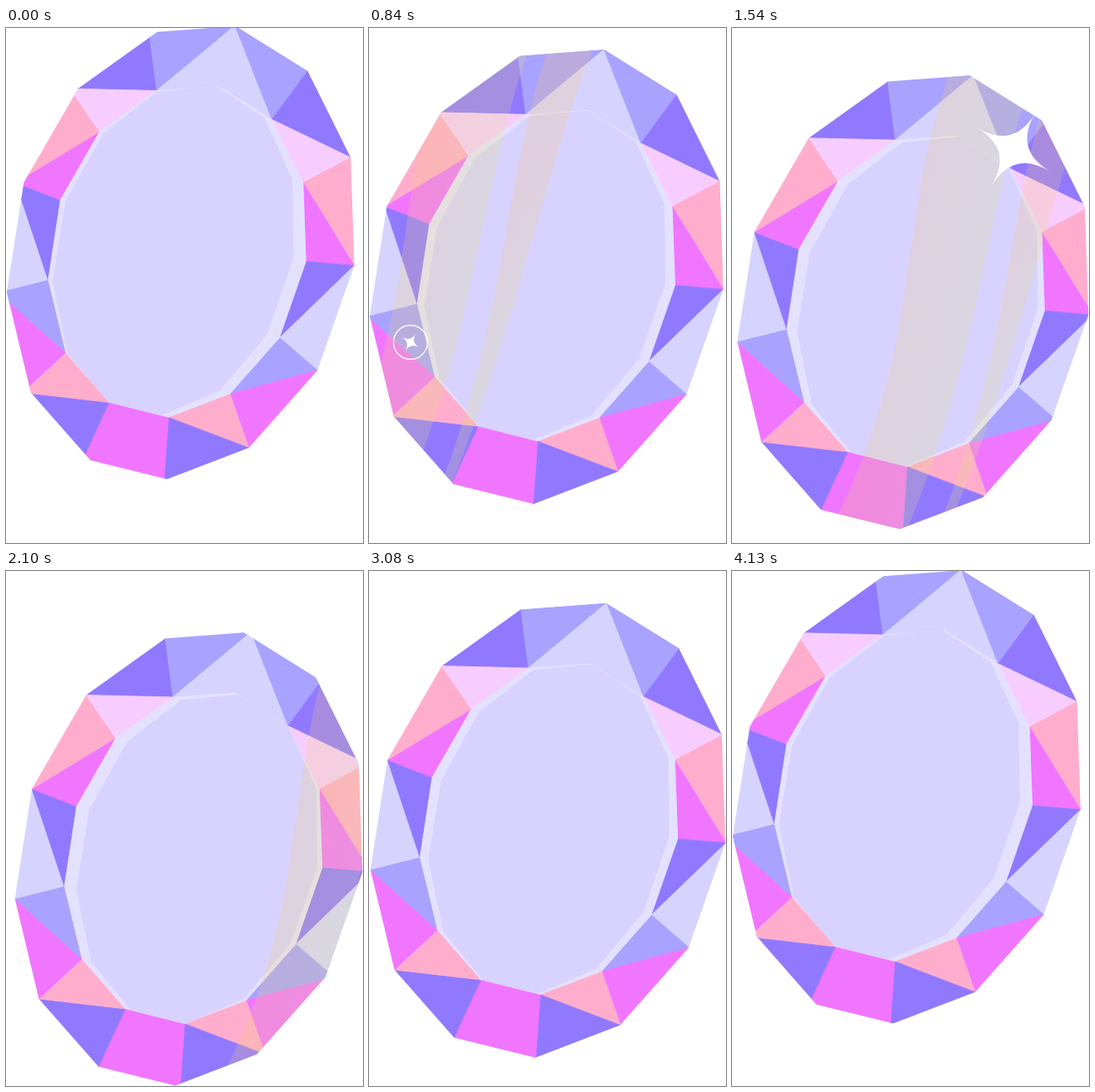
These frames come from a looping animation (430x621 px, 4200 ms). An HTML page with a canvas:

```html
<!DOCTYPE html>
<html lang="en">
<head>
<meta charset="utf-8">
<title>Gem</title>
<style>
html, body { margin: 0; width: 100%; height: 100%; overflow: hidden; background: #fff; }
canvas { display: block; }
</style>
</head>
<body>
<canvas id="stage" width="430" height="621"></canvas>
<script>
const ctx = document.getElementById('stage').getContext('2d');
const LOOP = 4200, STEP = 70, SIDES = 13;

// Regular polygon sheared onto a slanted ellipse: centre, cosine axis, sine axis
function ring(cx, cy, ux, uy, vx, vy) {
  return Array.from({ length: SIDES }, (_, k) => {
    const a = 2 * Math.PI * k / SIDES, c = Math.cos(a), s = Math.sin(a);
    return [cx + ux * c + vx * s, cy + uy * c + vy * s];
  });
}

const outer = ring(207.4, 269.2, -35, -264.4, 213.6, -81.8);
const inner = ring(207.5, 268.2, -26, -192.7, 154.9, -58.9);
const table = ring(203, 267.1, -20.4, -190.5, 145.6, -61.6);

const colors = {
  D: '#9179ff', B: '#a9a2ff', P: '#d6d4ff', L: '#f7cdff', S: '#ffadcd', M: '#f176ff'
};
// Walk round the stone: colour, then which ring advances (o = outer, i = inner)
const walk = 'Do Bo Pii Bo Do Li So Mi Di Po Bi Mo Si Do Moi Do Si Mo Bi Po Di Mi So Li';

function buildFacets() {
  let o = SIDES - 1, i = 0;
  return walk.split(' ').map(([key, ...moves]) => {
    const rim = [outer[o]], core = [inner[i]];
    for (const m of moves) {
      if (m === 'o') rim.push(outer[o = (o + 1) % SIDES]);
      else core.push(inner[i = (i + 1) % SIDES]);
    }
    return { color: colors[key], points: rim.concat(core.reverse()) };
  });
}
const facets = buildFacets();

// Band edges: x at the top, x at the bottom, sway of the curve between
const bands = [
  [[272, 100, 86], [372, 196, 52]],
  [[394, 233, 56], [450, 245, 41]]
];
const TOP = -30, BOTTOM = 580;

const sparkles = [
  { peak: 670, x: 50, y: 379 },
  { peak: 1540, x: 339, y: 146.5 },
  { peak: 2660, x: 166, y: 182 },
  { peak: 3570, x: 226, y: 532 }
];

function trace(points, dx = 0, dy = 0) {
  ctx.beginPath();
  points.forEach(([x, y]) => ctx.lineTo(x + dx, y + dy));
  ctx.closePath();
}

function fill(points, color, dx, dy) {
  trace(points, dx, dy);
  ctx.fillStyle = color;
  ctx.fill();
}

// Halfway between a steady and a smooth rise and fall
function drift(t) {
  const u = 1 - Math.abs(1 - t / (LOOP / 2));
  return (u + u * u * (3 - 2 * u)) / 2;
}

function drawFacets() {
  ctx.lineWidth = 0.7;
  ctx.lineJoin = 'round';
  for (const { color, points } of facets) {
    fill(points, color);
    ctx.strokeStyle = color;
    ctx.stroke();
  }
}

function edge([top, bottom, sway]) {
  const x1 = (2 * top + bottom) / 3 - 0.3 * sway;
  const x2 = (top + 2 * bottom) / 3 + sway;
  return [top, TOP, x1, 170, x2, 330, bottom, BOTTOM];
}

function drawShine(t) {
  ctx.save();
  ctx.translate(0.243 * (t - 1540), 0);
  for (const [a, b] of bands.map(pair => pair.map(edge))) {
    const tint = ctx.createLinearGradient(a[2], 250, b[2], 275);
    tint.addColorStop(0, 'rgba(248,200,110,.225)');
    tint.addColorStop(0.5, 'rgba(230,216,112,.225)');
    tint.addColorStop(1, 'rgba(224,226,122,.225)');
    ctx.beginPath();
    ctx.moveTo(a[0], a[1]);
    ctx.bezierCurveTo(...a.slice(2));
    ctx.lineTo(b[6], b[7]);
    ctx.bezierCurveTo(b[4], b[5], b[2], b[3], b[0], b[1]);
    ctx.closePath();
    ctx.fillStyle = tint;
    ctx.fill();
  }
  ctx.restore();
}

function drawGem(t) {
  const p = drift(t), dx = 19.5 * p, dy = 76.5 * p;
  ctx.save();
  // The window follows the height only, so the stone slides sideways inside it
  trace(outer, 9.75, dy);
  ctx.clip();
  ctx.translate(dx, dy);
  trace(outer);
  ctx.clip();
  drawFacets();
  fill(inner, '#e4e1ff');
  ctx.save();
  trace(inner);
  ctx.clip();
  fill(table, '#d8d2ff', 9 * p, 2.5 * p);
  ctx.restore();
  ctx.translate(-dx, 0);
  drawShine(t);
  ctx.restore();
}

function drawStar(r) {
  ctx.beginPath();
  for (let k = 0; k <= 4; k++) {
    const a = (31 + 90 * k) * Math.PI / 180;
    const x = r * Math.cos(a), y = r * Math.sin(a);
    if (k) ctx.quadraticCurveTo(0, 0, x, y);
    else ctx.moveTo(x, y);
  }
  ctx.fillStyle = '#fff';
  ctx.fill();
}

function drawSparkle({ peak, x, y }, t) {
  const d = t - peak;
  if (d <= -210 || d >= 245) return;
  const size = d < 0 ? 1 + d / 210 : 1 - d / 225;
  ctx.save();
  ctx.translate(x, y);
  if (size > 0) drawStar(51 * size);
  if (d > 70) {
    ctx.beginPath();
    ctx.arc(0, 0, 20.5 * Math.sqrt(d / 170), 0, 2 * Math.PI);
    ctx.strokeStyle = '#fff';
    ctx.lineWidth = 1.3 * Math.min(1, (245 - d) / 75);
    ctx.stroke();
  }
  ctx.restore();
}

function draw(t) {
  ctx.fillStyle = '#fff';
  ctx.fillRect(0, 0, 430, 621);
  drawGem(t);
  sparkles.forEach(s => drawSparkle(s, t));
}

const start = performance.now();
function tick() {
  const t = Math.max(0, performance.now() - start) % LOOP;
  draw(Math.floor(t / STEP) * STEP);
  requestAnimationFrame(tick);
}
tick();
</script>
</body>
</html>
```
